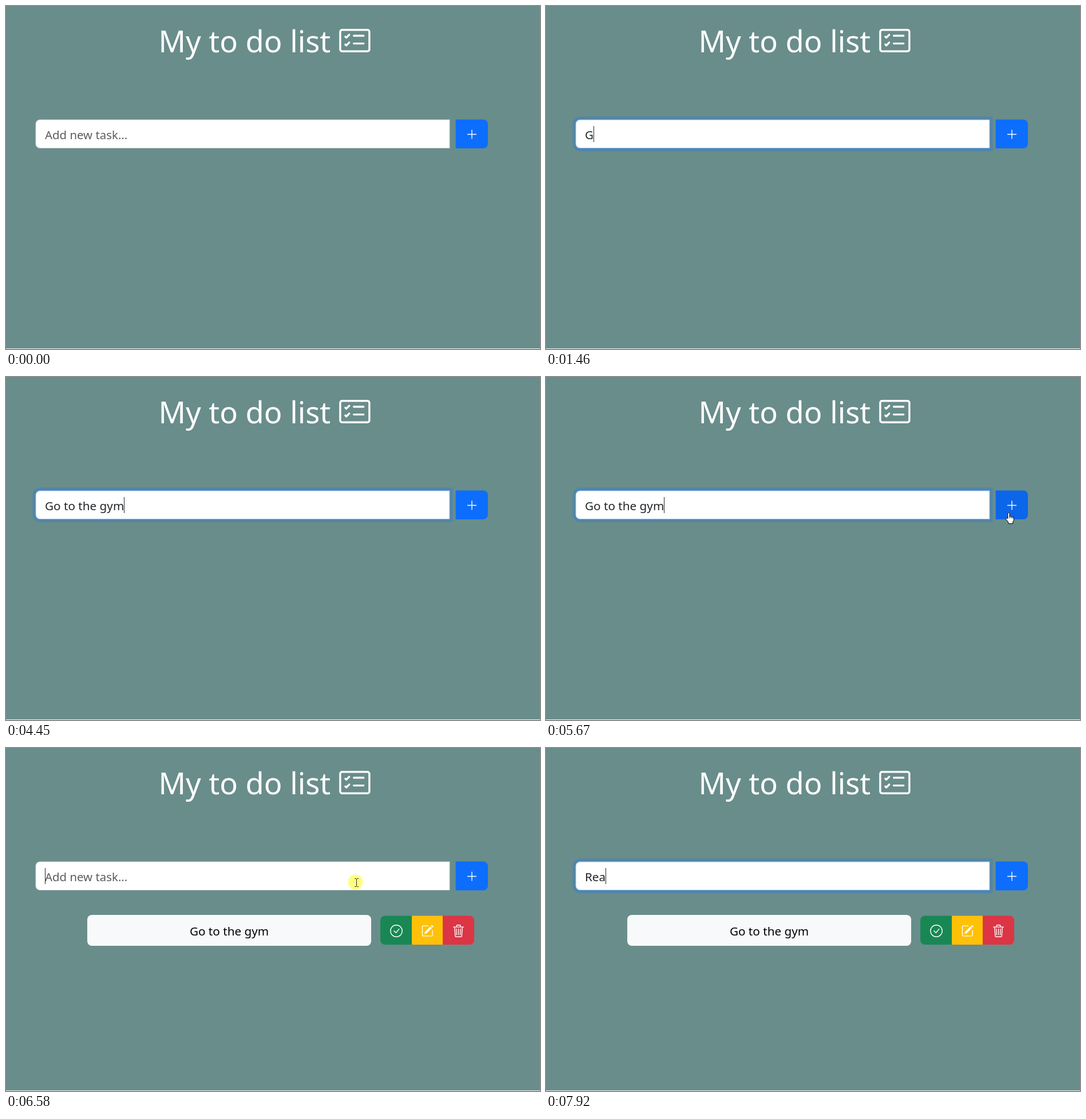
An HTML page with a canvas for the animation above (8 s loop, 933 by 600 pixels).

```html
<!DOCTYPE html>
<html lang="en">
<head>
<meta charset="utf-8">
<title>To do list</title>
<style>
  html, body { margin: 0; width: 100%; height: 100%; overflow: hidden; background: #698d8b; }
  canvas { display: block; }
</style>
</head>
<body>
<canvas id="stage" width="933" height="600"></canvas>
<script>
const ctx = document.getElementById('stage').getContext('2d');
const FONT = '"Noto Sans", "Open Sans", sans-serif';
const LOOP = 8000, TRANSITION = 140, BLINK = 530, CLICK_GLOW = 130;

// Moments of the story, in ms
const ENTER = 70, FIRST_CLICK = 460, FIRST_FOCUS = 590;
const DEPART = 5040, HOVER = 5600, ARRIVE = 5670, PRESS = 5810, ADDED = 5880, RELEASE = 6000;
const LEAVE = 6130, UNHOVER = 6210, SECOND_CLICK = 6580;

const TASK = { word: 'Go to the gym', start: 1460, end: 4400 };
const NEXT = { word: 'Rea', start: 7460, end: 7915 };

// Pointer journeys along quadratic curves
const FIELD = [243, 231], PLUS = [808.5, 237];
const JOURNEYS = [
  { start: ENTER, end: 260, from: [806, 554], via: [400, 300], to: FIELD },
  { start: DEPART, end: ARRIVE, from: FIELD, via: [500, 358], to: PLUS },
  { start: ARRIVE, end: 5950, from: PLUS, via: [811, 236], to: [812.5, 235] },
  { start: LEAVE, end: 6520, from: [812.5, 235], via: [660, 238], to: [612, 235] }
];

const ICONS = {
  done: { line: 'M.5 8a7.5 7.5 0 1 0 15 0a7.5 7.5 0 1 0-15 0M4.9 7.9L7.5 10.4L11.5 5.5' },
  edit: {
    line: 'M9 1.5H2.5a1 1 0 0 0-1 1v11a1 1 0 0 0 1 1h11a1 1 0 0 0 1-1v-6',
    fill: 'M13.9.4L15.7 2.2L14.4 3.7L12.4 1.7ZM13.75 4.4L11.75 2.4L4.9 9.2L4 12.1L6.9 11.2Z'
  },
  remove: {
    line: 'M1.5 3h13M5.5 3V1.5a1 1 0 0 1 1-1h3a1 1 0 0 1 1 1V3M3 3l.85 11.6a1 1 0 0 0 1 .9h6.3' +
      'a1 1 0 0 0 1-.9L13 3M5.3 5.3l.4 7.7M8 5.3V13M10.7 5.3l-.4 7.7'
  },
  list: {
    line: 'M1.5 2.5h13a1 1 0 0 1 1 1v9a1 1 0 0 1-1 1h-13a1 1 0 0 1-1-1v-9a1 1 0 0 1 1-1' +
      'M7.5 5.5h5M7.5 9.5h5M3.15 6l.5.5l1.5-1.5M3.15 10l.5.5l1.5-1.5'
  }
};
const ARROW = new Path2D('M0 0V17L4 13.2L6.5 19.2L9.1 18.1L6.6 12.3H12Z');
const HAND = new Path2D('M-1.7 11V1.5Q0-1 1.5 1.5V7Q3 5.8 4.3 7.4Q5.8 6.4 7 8Q8.6 7.6 8.8 9.5' +
  'V13.5L7 17V19.5H-.5V17.5L-5 11.5Q-5 9-3 9.6Z');
const BEAM = new Path2D('M-3.5-6.5H-1L0-6L1-6.5H3.5M0-6V6.5M-3.5 7.5H-1L0 7L1 7.5H3.5');

const clamp = v => Math.min(1, Math.max(0, v));
const ramp = (t, start) => clamp((t - start) / TRANSITION);
const fade = (t, on, off) => ramp(t, on) - ramp(t, off);

function box(x, y, w, h, radii, fill) {
  ctx.beginPath();
  ctx.roundRect(x, y, w, h, radii);
  ctx.fillStyle = fill;
  ctx.fill();
}

function text(str, x, y, size, color, align = 'left') {
  ctx.font = `${size}px ${FONT}`;
  ctx.textAlign = align;
  ctx.fillStyle = color;
  ctx.fillText(str, x, y);
}

function icon({ line, fill }, cx, cy, size) {
  ctx.save();
  ctx.translate(cx - size / 2, cy - size / 2);
  ctx.scale(size / 16, size / 16);
  ctx.strokeStyle = ctx.fillStyle = '#fff';
  ctx.lineWidth = 1;
  ctx.lineCap = ctx.lineJoin = 'round';
  ctx.stroke(new Path2D(line));
  if (fill) ctx.fill(new Path2D(fill));
  ctx.restore();
}

function typedCount({ word, start, end }, t) {
  if (t < start) return 0;
  const step = (end - start) / (word.length - 1);
  return Math.min(word.length, Math.floor((t - start) / step) + 1);
}

// The caret blinks, and stays lit while keys are being pressed
function caretVisible(entry, t) {
  const focused = t < ADDED ? FIRST_FOCUS : SECOND_CLICK;
  if (t < focused || (t >= PRESS && t < ADDED)) return false;
  const lastActive = t < entry.start ? focused : Math.min(t, entry.end);
  return Math.floor((t - lastActive) / BLINK) % 2 === 0;
}

function drawInput(t) {
  const focus = fade(t, FIRST_FOCUS, PRESS - 10) + ramp(t, SECOND_CLICK);
  const x = 51.5, y = 198.5, w = 724, h = 50.5;
  if (focus > 0) {
    const s = 5 * focus;
    box(x - s, y - s, w + 2 * s, h + 2 * s, [8 + s, 0, 0, 8 + s], `rgba(13,110,253,${0.25 * focus})`);
  }
  box(x, y, w, h, [8, 0, 0, 8], focus > 0.5 ? '#86b7fe' : '#ced4da');
  box(x + 1, y + 1, w - 2, h - 2, [7, 0, 0, 7], '#fff');

  const entry = t < ADDED ? TASK : NEXT;
  const typed = entry.word.slice(0, typedCount(entry, t));
  if (!typed) text('Add new task...', 68, 233, 20.4, '#595c5f');
  text(typed, 68, 233, 20.7, '#212529');
  if (caretVisible(entry, t)) {
    ctx.fillStyle = '#212529';
    ctx.fillRect(Math.round(68 + ctx.measureText(typed).width), 210, 1, 28);
  }
}

function drawAddButton(t) {
  const shade = 0.15 * fade(t, HOVER, UNHOVER) + 0.05 * fade(t, PRESS, RELEASE);
  for (const fill of ['#0d6efd', `rgba(0,0,0,${shade})`]) box(785.7, 198.5, 56.3, 50.5, [0, 8, 8, 0], fill);
  ctx.strokeStyle = '#fff';
  ctx.lineWidth = 1.4;
  ctx.stroke(new Path2D('M806 224.5h16M814 216.5v16'));
}

function drawTask() {
  box(142, 292, 496, 54, 8, '#f8f9fa');
  text(TASK.word, 390, 328, 20.7, '#000', 'center');
  box(654, 293.5, 55, 50.5, [8, 0, 0, 8], '#198754');
  box(709, 293.5, 54, 50.5, 0, '#ffc107');
  box(763, 293.5, 55, 50.5, [0, 8, 8, 0], '#dc3545');
  [ICONS.done, ICONS.edit, ICONS.remove].forEach((shape, i) => icon(shape, 682 + 54.3 * i, 320, 21.8));
}

function pointerAt(t) {
  const { start, end, from, via, to } = JOURNEYS.findLast(j => j.start <= t);
  const u = clamp((t - start) / (end - start));
  return from.map((a, k) => (1 - u) ** 2 * a + 2 * u * (1 - u) * via[k] + u * u * to[k]);
}

function drawPointer(t) {
  const hiddenByTyping = (t >= TASK.start && t < DEPART) || t >= NEXT.start;
  if (t < ENTER || hiddenByTyping) return;
  const [x, y] = pointerAt(t);
  if ([FIRST_CLICK, PRESS, SECOND_CLICK].some(c => t >= c && t < c + CLICK_GLOW)) {
    ctx.beginPath();
    ctx.arc(x - 1.5, y - 0.5, 13, 0, 2 * Math.PI);
    ctx.fillStyle = 'rgba(255,255,0,.5)';
    ctx.fill();
  }
  const inRow = y > 198 && y < 249;
  ctx.save();
  ctx.lineWidth = 1;
  if (inRow && x < 776) {
    ctx.translate(Math.round(x) + 0.5, Math.round(y));
    ctx.strokeStyle = '#333';
    ctx.stroke(BEAM);
  } else {
    const shape = inRow && x > 786 ? HAND : ARROW;
    ctx.translate(x, y);
    ctx.fillStyle = '#fff';
    ctx.strokeStyle = '#000';
    ctx.fill(shape);
    ctx.stroke(shape);
    if (shape === HAND) ctx.stroke(new Path2D('M1.5 7V10M4.3 7.5V10M7 8V10.5'));
  }
  ctx.restore();
}

function draw(now) {
  const t = now % LOOP;
  ctx.fillStyle = '#698d8b';
  ctx.fillRect(0, 0, 933, 600);
  ctx.fillStyle = '#f4f6f6';
  ctx.fillRect(0, 599, 933, 1);
  text('My to do list', 266.5, 81, 52.4, '#fff');
  icon(ICONS.list, 609.4, 60.5, 54.4);
  drawInput(t);
  drawAddButton(t);
  if (t >= ADDED) drawTask();
  drawPointer(t);
  requestAnimationFrame(draw);
}
requestAnimationFrame(draw);
</script>
</body>
</html>
```
